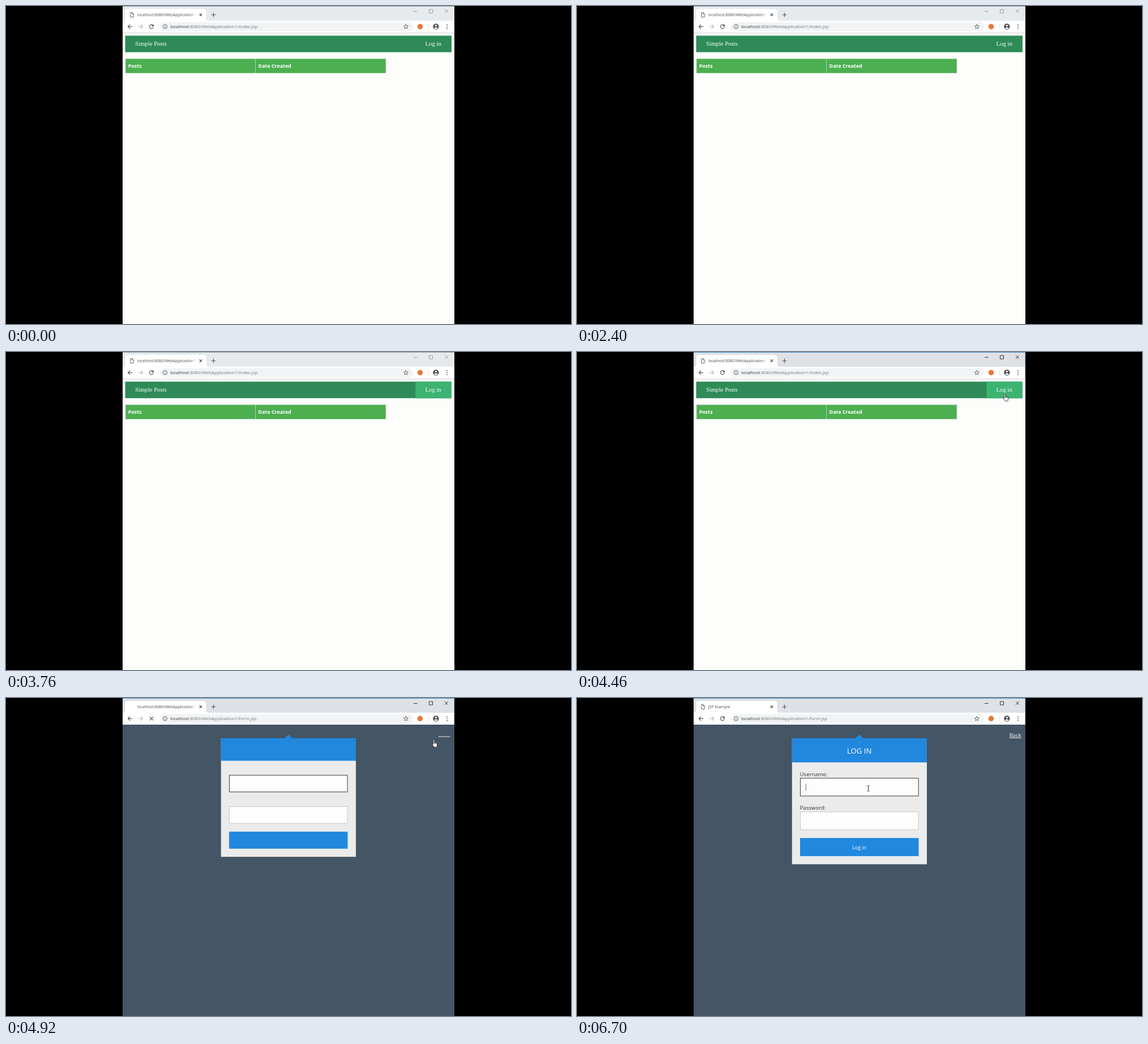
Recreate the animation shown at these times as an HTML page. Size 998 px wide and 561 px high, loop 8 s.

```html
<!DOCTYPE html>
<html lang="en">
<head>
<meta charset="utf-8">
<title>Log in demo</title>
<style>
  html, body { margin: 0; width: 100%; height: 100%; overflow: hidden; background: #000; }
  svg { display: block; width: 100vw; height: 100vh; }
  text { font-family: "Open Sans", sans-serif; white-space: pre; }
  .serif { font: 10.75px "Liberation Serif", serif; fill: #fff; }
  .head { font-size: 8.9px; font-weight: 700; fill: #fff; }
  .tab { font-size: 6.85px; fill: #4a4d51; }
  .url { font-size: 7.93px; fill: #74787c; }
  .label { font-size: 9.52px; fill: #333; }
  .line { fill: none; stroke: #54585c; stroke-width: 1.2; }
  .blue { fill: #28d; }
  .field { fill: #fdfdfd; stroke: #c8c8c8; stroke-width: 1; }
  .focus { stroke: #3c3c3c; }
</style>
</head>
<body>
<svg viewBox="0 0 998 561" preserveAspectRatio="none">
  <defs>
    <linearGradient id="fade">
      <stop stop-color="#fff" stop-opacity="0"/>
      <stop offset="1" stop-color="#fff"/>
    </linearGradient>
  </defs>
  <rect width="998" height="561"/>

  <!-- Browser frame -->
  <rect id="titleBar" x="206" width="586" height="27"/>
  <rect id="topEdge" x="206" width="586" height="1"/>
  <path fill="#fff" d="M206 26q4.500 0 4.500-4V10q0-5 5-5h33h100q5 0 5 5v12q0 4 4.500 4H792v21H206z"/>
  <rect x="272" y="28.500" width="447" height="16" rx="8" fill="#f1f3f4"/>
  <path id="pageIcon" class="line" style="stroke-width:.9" d="M219.700 11.500h3.200l2.300 2.400v5.600h-5.500zM222.700 11.700v2.400h2.400"/>
  <text id="tabTitle" class="tab" x="232" y="17.800"></text>
  <rect x="327" y="8" width="8" height="14" fill="url(#fade)"/>
  <rect x="335" y="8" width="4" height="14" fill="#fff"/>
  <path class="line" d="M341.700 13.200l4.400 4.400m0-4.400l-4.400 4.400M366.500 11.800v7.400m-3.700-3.700h7.400"/>
  <path id="windowButtons" class="line" style="stroke-width:.9" d="M720 9.500h6.500M747.500 6.200h6v6h-6zM775 6.200l5.800 5.800m0-5.800l-5.800 5.800"/>
  <path class="line" d="M223 36.300h-7.500m3.600-3.700l-3.700 3.700 3.700 3.700"/>
  <path class="line" style="stroke:#bbbec1" d="M234 36.300h7.500m-3.600-3.700l3.700 3.700-3.700 3.700"/>
  <g id="reloadIcon">
    <path class="line" d="M259.500 34a3.500 3.500 0 1 0 .8 3.200"/>
    <path fill="#54585c" d="M261 32v4h-4z"/>
  </g>
  <path id="stopIcon" class="line" d="M253.900 33.200l6.200 6.200m0-6.200l-6.200 6.200"/>
  <circle class="line" style="stroke-width:.9" cx="281" cy="36.300" r="3.700"/>
  <path class="line" style="stroke-width:.9" d="M281 35.700v2.600m0-4.400v.9"/>
  <text class="url" x="290" y="39.200"><tspan fill="#35383b">localhost</tspan><tspan id="path"></tspan></text>
  <path class="line" style="stroke-width:.9" d="M706.400 32.300l1.100 2.700 2.900.2-2.200 1.900.7 2.900-2.500-1.600-2.500 1.600.7-2.900-2.200-1.900 2.900-.2z"/>
  <circle cx="731.500" cy="36.300" r="4.800" fill="#e67a35"/>
  <path stroke="#dadce0" d="M746.500 31.500v10"/>
  <circle cx="759.400" cy="36.300" r="5.200" fill="#54585c"/>
  <circle cx="759.400" cy="34.500" r="1.600" fill="#fff"/>
  <path fill="#fff" d="M756 39.200q3.400-3.400 6.800 0q-3.400 2.600-6.800 0"/>
  <g fill="#54585c">
    <circle cx="779" cy="33" r=".9"/><circle cx="779" cy="36.500" r=".9"/><circle cx="779" cy="40" r=".9"/>
  </g>

  <!-- Posts page -->
  <g id="postsPage">
    <rect x="206" y="47" width="586" height="514" fill="#fdfdfc"/>
    <path stroke="#d3d5d8" d="M206 47.500h586"/>
    <rect x="210.500" y="52.300" width="576.500" height="29.200" fill="#2e8b57"/>
    <rect id="hover" x="723.300" y="52.300" width="63.700" height="29.200" fill="#3cb371"/>
    <text class="serif" x="228" y="70.300">Simple Posts</text>
    <text class="serif" x="740.500" y="70.300">Log in</text>
    <path fill="#4caf50" stroke="#c3dfc3" stroke-width=".8" d="M211 93h460v25.500h-460zM440.500 93v25.500"/>
    <text class="head" x="215.800" y="109">Posts</text>
    <text class="head" x="445.600" y="109">Date Created</text>
  </g>

  <!-- Log in page -->
  <g id="formPage">
    <rect x="206" y="47" width="586" height="514" fill="#456"/>
    <path class="blue" d="M491.500 71.500l7.200-7 7.200 7z"/>
    <rect id="panel" x="379.800" y="71" width="238.200" fill="#ebebeb"/>
    <rect id="header" class="blue" x="379.800" y="71" width="238.200"/>
    <rect id="userField" class="field focus" x="394.500" width="208.600"/>
    <rect id="passField" class="field" x="394.500" width="208.600"/>
    <rect id="button" class="blue" x="394" width="209.500"/>
    <path id="backLine" stroke="#fff" stroke-width=".9"/>
    <g id="formText">
      <text x="498.700" y="97.600" font-size="13.200" fill="#fff" text-anchor="middle">LOG IN</text>
      <text class="label" x="393.700" y="137.700">Username:</text>
      <text class="label" x="393.700" y="197.300">Password:</text>
      <text x="498.700" y="266.500" font-size="8.930" fill="#fff" text-anchor="middle">Log in</text>
      <text class="label" x="763.700" y="69" style="fill:#fff">Back</text>
    </g>
    <path id="caret" stroke="#444" stroke-width=".8" d="M404.400 151v12.500"/>
  </g>

  <path id="sideEdge" stroke="#6f9dc0" stroke-width=".6" d="M791.700 0v47"/>

  <!-- Pointers, each with its hot spot at 0,0 -->
  <g id="pointer" stroke-linejoin="round">
    <path id="hand" fill="#fff" stroke="#222" stroke-width=".8" d="M-1 1q0-1.200 1-1.200t1 1.200v4q.9-.7 1.700.2q1-.5 1.600.4q1.200-.3 1.500 1v3q0 1.800-1 3.600H.2Q-.5 11.500-2.600 8.600Q-3 7.200-1.800 7.300L-1 8.200zM1 5v2.500M2.800 5.400v2.100M4.400 5.800v1.800"/>
    <path id="arrow" fill="#fff" stroke="#222" stroke-width=".8" d="M0 0v10l2.300-2.100 1.600 3.700 1.500-.7-1.600-3.600h3.100z"/>
    <path id="beam" fill="none" stroke="#222" stroke-width=".9" d="M-2.200-4.700h1.600l.6.500.6-.5h1.600M0-4.200v8.400M-2.200 4.700h1.600l.6-.5.6.5h1.600"/>
  </g>
</svg>

<script>
const LOOP = 8000;
const AT = { hover: 3500, active: 4400, loading: 4700, form: 4920, arrow: 5040, styled: 5240, caret: 6700 };
const ROUTE = [[5040, 755.7, 73.5], [5620, 603.3, 125.5], [5760, 552, 145], [6300, 514.5, 159.5]];

const el = id => document.getElementById(id);
const show = (id, on) => el(id).style.display = on ? "" : "none";
const place = (id, top, bottom) => {
  el(id).setAttribute("y", top);
  el(id).setAttribute("height", bottom - top);
};
const write = (id, text) => {
  if (el(id).textContent !== text) el(id).textContent = text;
};

function pointerAt(t) {
  const next = ROUTE.findIndex(([time]) => time > t);
  if (next === 0) return ROUTE[0].slice(1);
  if (next < 0) return ROUTE.at(-1).slice(1);
  const [t0, x0, y0] = ROUTE[next - 1], [t1, x1, y1] = ROUTE[next];
  const k = (t - t0) / (t1 - t0);
  return [x0 + (x1 - x0) * k, y0 + (y1 - y0) * k];
}

function drawWindow(t) {
  const active = t >= AT.active, form = t >= AT.form, styled = t >= AT.styled;
  const loading = t >= AT.loading && !styled;
  el("titleBar").style.fill = active ? "#dee1e6" : "#e7eaed";
  el("topEdge").style.fill = active ? "#3d8cc9" : "#8a9c9f";
  el("windowButtons").style.stroke = active ? "#222" : "#929598";
  show("sideEdge", active);
  show("pageIcon", !loading);
  show("reloadIcon", !loading);
  show("stopIcon", loading);
  write("tabTitle", styled ? "JSP Example" : "localhost:8080/WebApplication1");
  write("path", ":8080/WebApplication1/" + (form ? "form.jsp" : "index.jsp"));
  show("postsPage", !form);
  show("hover", t >= AT.hover);
}

// The form grows a little once its text is laid out.
function drawForm(t) {
  const styled = t >= AT.styled;
  show("formPage", t >= AT.form);
  show("formText", styled);
  show("caret", t >= AT.caret);
  place("panel", 71, styled ? 293.3 : 280.2);
  place("header", 71, styled ? 113.6 : 110.7);
  place("userField", styled ? 141.4 : 136.2, styled ? 172.9 : 165.7);
  place("passField", styled ? 200.9 : 191.6, styled ? 232.3 : 221.1);
  place("button", styled ? 247 : 235.8, styled ? 279 : 265.8);
  el("backLine").setAttribute("d", `M763.700 ${styled ? 70.4 : 68.2}h21`);
}

function drawPointer(t) {
  const [x, y] = pointerAt(t);
  const inField = x > 394 && x < 603 && y > 141 && y < 173;
  show("pointer", t >= AT.active);
  show("hand", t < AT.arrow);
  show("arrow", t >= AT.arrow && !inField);
  show("beam", inField);
  el("pointer").setAttribute("transform", `translate(${x} ${y})`);
}

function frame(now) {
  const t = now % LOOP;
  drawWindow(t);
  drawForm(t);
  drawPointer(t);
  requestAnimationFrame(frame);
}
frame(0);
</script>
</body>
</html>
```
